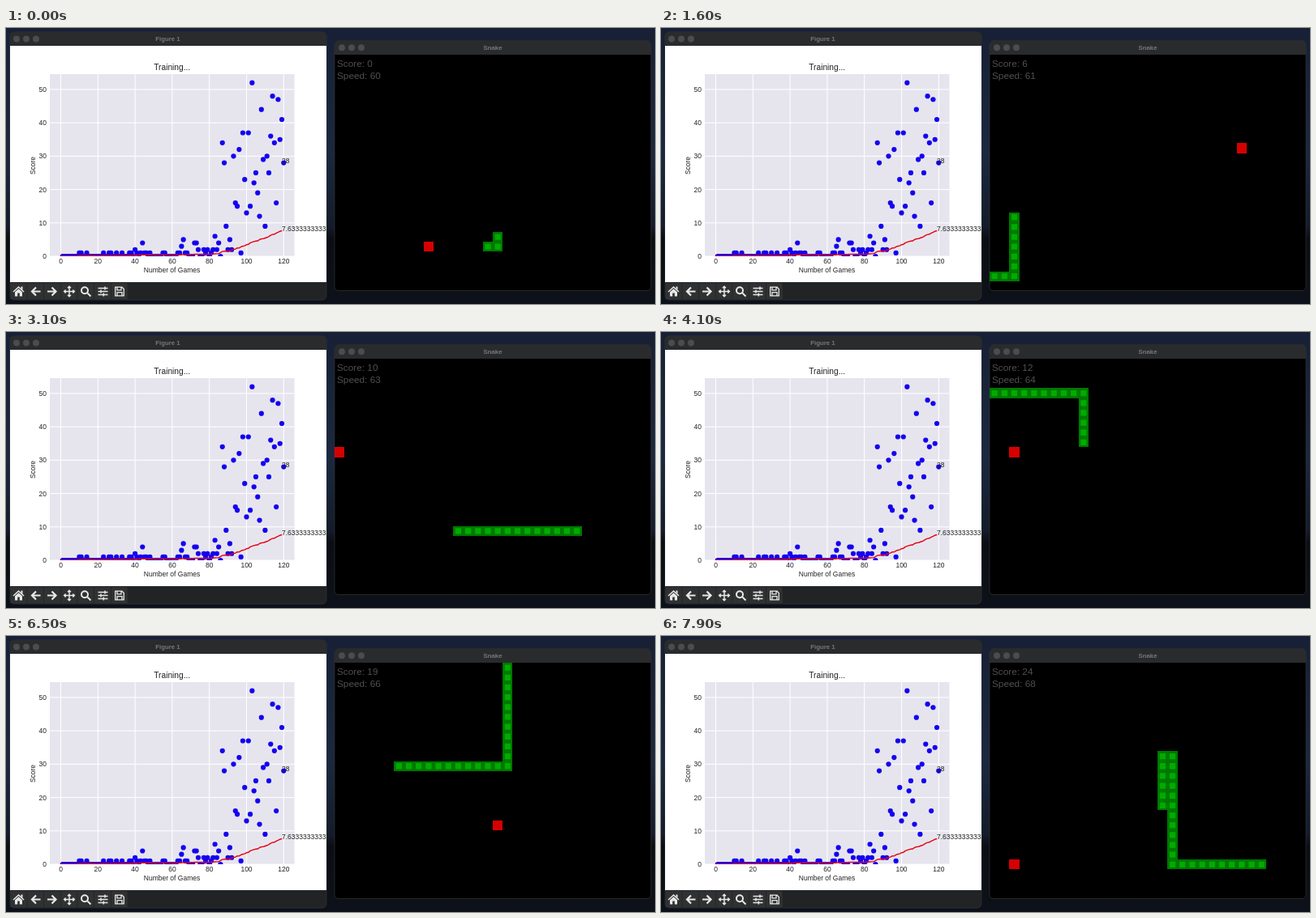
Write an HTML page that moves like this. It is 800x341 px and loops after 8000 ms.

```html
<!DOCTYPE html>
<html lang="en">
<head>
<meta charset="utf-8">
<title>Snake training</title>
<style>
  html, body { margin: 0; width: 100%; height: 100%; overflow: hidden; background: #0c0f16; }
  svg { display: block; width: 800px; height: 341px; }
  text { font-family: "Liberation Sans", Arial, sans-serif; }
  .bar { font-size: 7.8px; font-weight: bold; fill: #77787a; text-anchor: middle; }
  .plot { font-size: 8.5px; fill: #222; }
  .mid { text-anchor: middle; }
  .end { text-anchor: end; }
  .hud { font-size: 11.8px; fill: #505050; }
  .icons { fill: none; stroke: #e8e8e8; stroke-width: 1.5; }
  .icons .solid { fill: #e8e8e8; stroke: none; }
</style>
</head>
<body>
<svg viewBox="0 0 800 341">
  <defs>
    <linearGradient id="sky" x2="0" y2="1">
      <stop offset="0" stop-color="#172034"/>
      <stop offset=".45" stop-color="#1c2840"/>
      <stop offset=".72" stop-color="#141c2b"/>
      <stop offset=".76" stop-color="#0b0e14"/>
      <stop offset="1" stop-color="#0d1119"/>
    </linearGradient>
    <clipPath id="axes"><rect x="54" y="57" width="301.5" height="225"/></clipPath>
    <clipPath id="figure"><rect x="5" y="22" width="390" height="292"/></clipPath>
    <g id="lights" fill="#4b4c4e">
      <circle r="4"/><circle cx="12" r="4"/><circle cx="24" r="4"/>
    </g>
  </defs>
  <rect width="800" height="341" fill="url(#sky)"/>

  <rect x="5" y="5" width="390" height="331" rx="5" fill="#222325" stroke="#3a3b3d" stroke-width=".6"/>
  <path d="M5 22V10a5 5 0 0 1 5-5h380a5 5 0 0 1 5 5v12z" fill="#2a2b2d"/>
  <use href="#lights" x="13" y="13.5"/>
  <text class="bar" x="199.5" y="16.2">Figure 1</text>
  <rect x="5" y="22" width="390" height="292" fill="#fff"/>
  <rect x="54" y="57" width="301.5" height="225" fill="#e6e5ee"/>
  <g id="grid" stroke="#fff" stroke-width="1"></g>
  <g clip-path="url(#axes)">
    <g id="dots" fill="#1400f0"></g>
    <polyline id="mean" fill="none" stroke="#e80010" stroke-width="1.4"/>
  </g>
  <g id="labels" class="plot" clip-path="url(#figure)">
    <text class="mid" x="204.7" y="52" font-size="10.2">Training...</text>
    <text class="mid" x="204.5" y="302.3">Number of Games</text>
    <text class="mid" transform="translate(36 170) rotate(-90)">Score</text>
  </g>

  <g id="buttons" fill="#303133"></g>
  <g class="icons">
    <path class="solid" transform="translate(15.5 325.5)" d="M0-6.5 7 0 6 1 0-4.5-6 1-7 0zM-4.5.8 0-3.3 4.5.8V6H1.3V2H-1.3V6H-4.5zM3-6H5V-2L3-4z"/>
    <path transform="translate(36.5 325.5)" stroke-width="2.2" d="M6 0H-4M.5-5-4.5 0 .5 5"/>
    <path transform="translate(57 325.5)" stroke-width="2.2" d="M-6 0H4M-.5-5 4.5 0-.5 5"/>
    <path transform="translate(78 325.5)" d="M-6 0H6M0-6V6M-2-4.3 0-6.3 2-4.3M-2 4.3 0 6.3 2 4.3M-4.3-2-6.3 0-4.3 2M4.3-2 6.3 0 4.3 2"/>
    <path transform="translate(98.5 325.5)" stroke-width="2" d="M2.5-1.3a4 4 0 1 1-8 0a4 4 0 1 1 8 0M1.5 1.6 6 6"/>
    <path transform="translate(119.5 325.5)" d="M-6-4H6M-6 0H6M-6 4H6M2.5-6V-2M-2.5-2V2M1-2M.8 2V6"/>
    <path transform="translate(140 325.5)" stroke-width="1.3" d="M-5.3-5.3H3L5.3-3V5.3H-5.3zM-3-5V-1.7H2V-5M-3 5V1.2H3V5"/>
  </g>

  <rect x="405" y="15.5" width="390" height="309" rx="5" fill="#000" stroke="#3a3b3d" stroke-width=".6"/>
  <path d="M405 33V20.5a5 5 0 0 1 5-5h380a5 5 0 0 1 5 5V33z" fill="#2a2b2d"/>
  <use href="#lights" x="414" y="24.2"/>
  <text class="bar" x="600" y="27">Snake</text>
  <path id="food" fill="#d60000"/>
  <path id="body" fill="#007800"/>
  <path id="core" fill="#00ac00"/>
  <text id="score" class="hud" x="408" y="47.6"></text>
  <text id="speed" class="hud" x="408" y="62.8"></text>
</svg>
<script>
const $ = id => document.getElementById(id);
const add = (id, markup) => $(id).insertAdjacentHTML('beforeend', markup);

// Chart: scores of games 1 to 120 and their running mean
const px = game => 67.5 + game * 2.29;
const py = score => 282 - score * 4.122;
const ones = [10, 11, 14, 23, 26, 27, 30, 33, 37, 38, 41, 43, 45, 46, 48, 55, 56, 63, 64, 67, 68, 78, 81];
const early = { 40: 2, 44: 4, 65: 3, 66: 5, 72: 4, 73: 4, 74: 2, 77: 2, 79: 2, 82: 2, 83: 6, 84: 2, 85: 4 };
const late = [34, 28, 9, 2, 5, 2, 30, 16, 15, 32, 1, 37, 23, 13, 37, 15, 52, 22, 25, 19, 12, 44,
  29, 9, 30, 25, 36, 48, 34, 16, 47, 35, 41, 28];

let total = 0, dots = '';
const means = [];
for (let game = 1; game <= 120; game++) {
  const score = game > 86 ? late[game - 87] : early[game] || +ones.includes(game);
  total += score;
  means.push(total / game);
  dots += `<circle cx="${px(game)}" cy="${py(score)}" r="3.1"/>`;
}
add('dots', dots);
$('mean').setAttribute('points', means.map((m, i) => px(i) + ',' + py(m)).join(' '));

for (let v = 0; v <= 120; v += 20) {
  add('grid', `<path d="M${px(v)} 57V282"/>`);
  add('labels', `<text class="mid" x="${px(v)}" y="291.3">${v}</text>`);
}
for (let v = 0; v <= 50; v += 10) {
  add('grid', `<path d="M54 ${py(v)}H355.5"/>`);
  add('labels', `<text class="end" x="50" y="${py(v) + 3}">${v}</text>`);
}
add('labels', `<text x="340" y="${py(28)}">28</text><text x="340" y="${py(means[119])}">${means[119]}</text>`);
for (let i = 0; i < 7; i++) add('buttons', `<rect x="${5.5 + i * 20.7}" y="315" width="20" height="20"/>`);

// Snake: corners of its route, a star marks food; each leg ends at the given time
const legs = [
  [0, '16,18 16,19 15,19'],
  [1600, '9,19* 9,8 22,8* 22,17 14,17* 14,4 6,4* 2,4 2,10* 2,22 0,22*'],
  [3100, '0,9 25,9* 27,9 27,13* 27,22 16,22* 16,20 25,20 25,18* 25,17 12,17'],
  [4100, '6,17 6,9 0,9* 0,14 9,14 9,3 5,3* 0,3'],
  [5500, '0,9 2,9* 31,9 31,14* 31,23 22,23* 22,19 4,19 4,18'],
  [6500, '4,12 5,12* 26,12 26,8* 26,0 19,0* 17,0 17,10 9,10* 6,10'],
  [7900, '6,16 16,16* 27,16 27,12* 27,6 21,6* 21,18 27,18 27,19* 27,20 18,20 18,9* 17,9 17,14'],
  [9000, '17,20 2,20*']
];
const route = [], meals = [], marks = [];
for (const [time, corners] of legs) {
  for (const corner of corners.split(' ')) {
    const [x, y] = corner.split(',').map(parseFloat);
    let [cx, cy] = route.at(-1) || [x, y - 1];
    while (cx !== x || cy !== y) {
      cx += Math.sign(x - cx);
      cy += Math.sign(y - cy);
      route.push([cx, cy]);
    }
    if (corner.endsWith('*')) meals.push(route.length - 1);
  }
  marks.push([time, route.length - 1]);
}

function stepAt(t) {
  const i = marks.findIndex(([time]) => time > t);
  const [t0, s0] = marks[i - 1], [t1, s1] = marks[i];
  return Math.round(s0 + (s1 - s0) * (t - t0) / (t1 - t0));
}

const gx = c => 405 + c * 12.19;
const gy = r => 33 + r * 12.16;
function cell([c, r]) {
  const x = Math.round(gx(c)), y = Math.round(gy(r));
  return `M${x} ${y}H${Math.round(gx(c + 1))}V${Math.round(gy(r + 1))}H${x}z`;
}
const inner = ([c, r]) => `M${gx(c) + 2.5} ${gy(r) + 2.5}h7.3v7.3h-7.3z`;

function draw() {
  const t = Math.floor(performance.now() % 8000 / 100) * 100;
  const step = stepAt(t);
  const score = meals.filter(m => m <= step).length;
  const before = meals.filter(m => m < step).length; // speed follows one step later
  const snake = route.slice(step - score - 2, step + 1);
  $('body').setAttribute('d', snake.map(cell).join(''));
  $('core').setAttribute('d', snake.map(inner).join(''));
  $('food').setAttribute('d', cell(route[meals[score]]));
  $('score').textContent = 'Score: ' + score;
  $('speed').textContent = 'Speed: ' + (60 + Math.floor(before / 3));
  requestAnimationFrame(draw);
}
draw();
</script>
</body>
</html>
```
